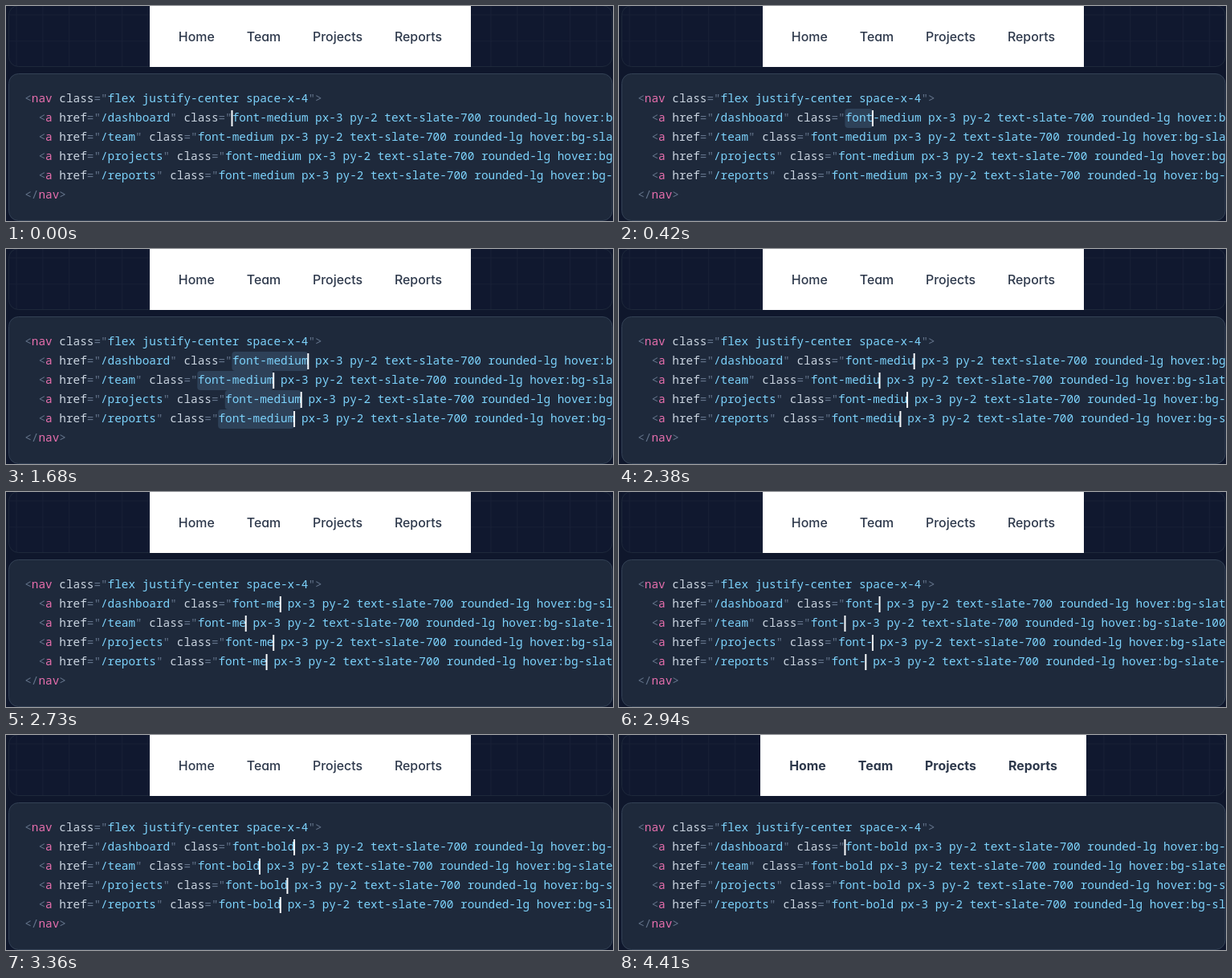
Write an HTML page that moves like this. It is 756 px wide and 268 px high and loops after 6.09 s.

```html
<!DOCTYPE html>
<html lang="en">
<head>
<meta charset="utf-8">
<title>Editing several cursors at once</title>
<style>
html, body { margin: 0; width: 756px; height: 268px; overflow: hidden; background: #0f172c; }
svg { display: block; }
.code text { font: 14.37px "Fira Code", "Noto Sans Mono", "DejaVu Sans Mono", monospace; white-space: pre; font-variant-ligatures: none; }
.nav text { font-family: Inter, sans-serif; font-size: 15.9px; font-feature-settings: "cv11"; text-anchor: middle; fill: #2d384b; }
.punct { fill: #64748b; }
.tag { fill: #e86fae; }
.attr { fill: #cbd5e1; }
.str { fill: #7dd3fc; }
</style>
</head>
<body>
<svg width="756" height="268" viewBox="0 0 756 268">
  <defs>
    <pattern id="grid" x="12.5" y="10.5" width="32.83" height="32.83" patternUnits="userSpaceOnUse">
      <path d="M0 .5H32.83M.5 0V32.83" stroke="#fff" stroke-opacity=".03"/>
    </pattern>
    <clipPath id="panel"><rect x="3" y="84" width="752" height="184" rx="12"/></clipPath>
  </defs>
  <rect x="3.5" y="-8" width="751.5" height="83.5" rx="12" fill="#10182f"/>
  <rect x="3.5" y="-.5" width="751.5" height="76" rx="12" fill="url(#grid)" stroke="#1e293b"/>
  <g class="nav" id="nav"></g>
  <rect x="3.5" y="84.5" width="751.5" height="183" rx="12" fill="#1e293b" stroke="#334155"/>
  <g class="code" clip-path="url(#panel)">
    <g id="selections" fill="#2e4158"></g>
    <g id="code"></g>
    <g id="carets" fill="#f8fafc"></g>
  </g>
</svg>
<script>
const LOOP = 6090, LEFT = 23.2, CHAR = 8.622, TOP = 104, ROW = 24;
const pages = ['dashboard', 'team', 'projects', 'reports'];
const titles = ['Home', 'Team', 'Projects', 'Reports'];
const mediumX = [237.3, 321, 413, 513.5], boldX = [235, 319.5, 413, 515.5];
const erasures = [2380, 2520, 2590, 2730, 2870, 2940];
const keys = [3080, 3150, 3290, 3360];
const tail = ' px-3 py-2 text-slate-700 rounded-lg hover:bg-slate-100 hover:text-slate-900';

const $ = id => document.getElementById(id);
const passed = (times, t) => times.filter(x => t >= x).length;
const span = (kind, s) => `<tspan class="${kind}">${s}</tspan>`;
const attr = (name, value) =>
  span('attr', ' ' + name) + span('punct', '="') + span('str', value) + span('punct', '"');
const open = (tag, attrs) => span('punct', '&lt;') + span('tag', tag) + attrs + span('punct', '>');
const row = (i, s) => `<text x="${LEFT}" y="${TOP + ROW * i + 16}">${s}</text>`;
const startX = i => LEFT + CHAR * (21 + pages[i].length);

function state(t) {
  const word = 'font-' + 'medium'.slice(0, 6 - passed(erasures, t)) + 'bold'.slice(0, passed(keys, t));
  const cursors = t < 3780 ? 1 + passed([1050, 1330, 1680], t) : 1;
  const col = t < 420 ? 0 : t < 700 ? 4 : t < 4130 ? word.length : t < 4410 ? 5 : 0;
  return { word, cursors, col, selected: t >= 420 && t < 1960, bold: passed([3500, 3570], t) / 2 };
}

function draw({ word, cursors, col, selected, bold }) {
  $('nav').innerHTML =
    `<rect x="${179 - 3 * bold}" width="${400 + 6 * bold}" height="76" fill="#fff"/>` +
    titles.map((s, i) => `<text x="${mediumX[i] + (boldX[i] - mediumX[i]) * bold}" y="43.8"
      font-weight="${500 + 200 * bold}">${s}</text>`).join('');

  $('code').innerHTML =
    row(0, open('nav', attr('class', 'flex justify-center space-x-4'))) +
    pages.map((p, i) => row(i + 1, '  ' + open('a', attr('href', '/' + p) + attr('class', word + tail)))).join('') +
    row(5, span('punct', '&lt;/') + span('tag', 'nav') + span('punct', '>'));

  const lines = pages.slice(0, cursors).map((_, i) => [startX(i), TOP + ROW * (i + 1)]);
  $('selections').innerHTML = !selected ? '' : lines.map(([x, y]) =>
    `<rect x="${x - .5}" y="${y}" width="${col * CHAR}" height="24" rx="4"/>`).join('');
  $('carets').innerHTML = lines.map(([x, y]) =>
    `<rect x="${x + col * CHAR - 1.4}" y="${y + 2}" width="2" height="20"/>`).join('');
}

let shown;
const began = performance.now();
function frame() {
  const s = state((performance.now() - began) % LOOP), key = JSON.stringify(s);
  if (key !== shown) draw(s);
  shown = key;
  requestAnimationFrame(frame);
}
frame();
</script>
</body>
</html>
```
